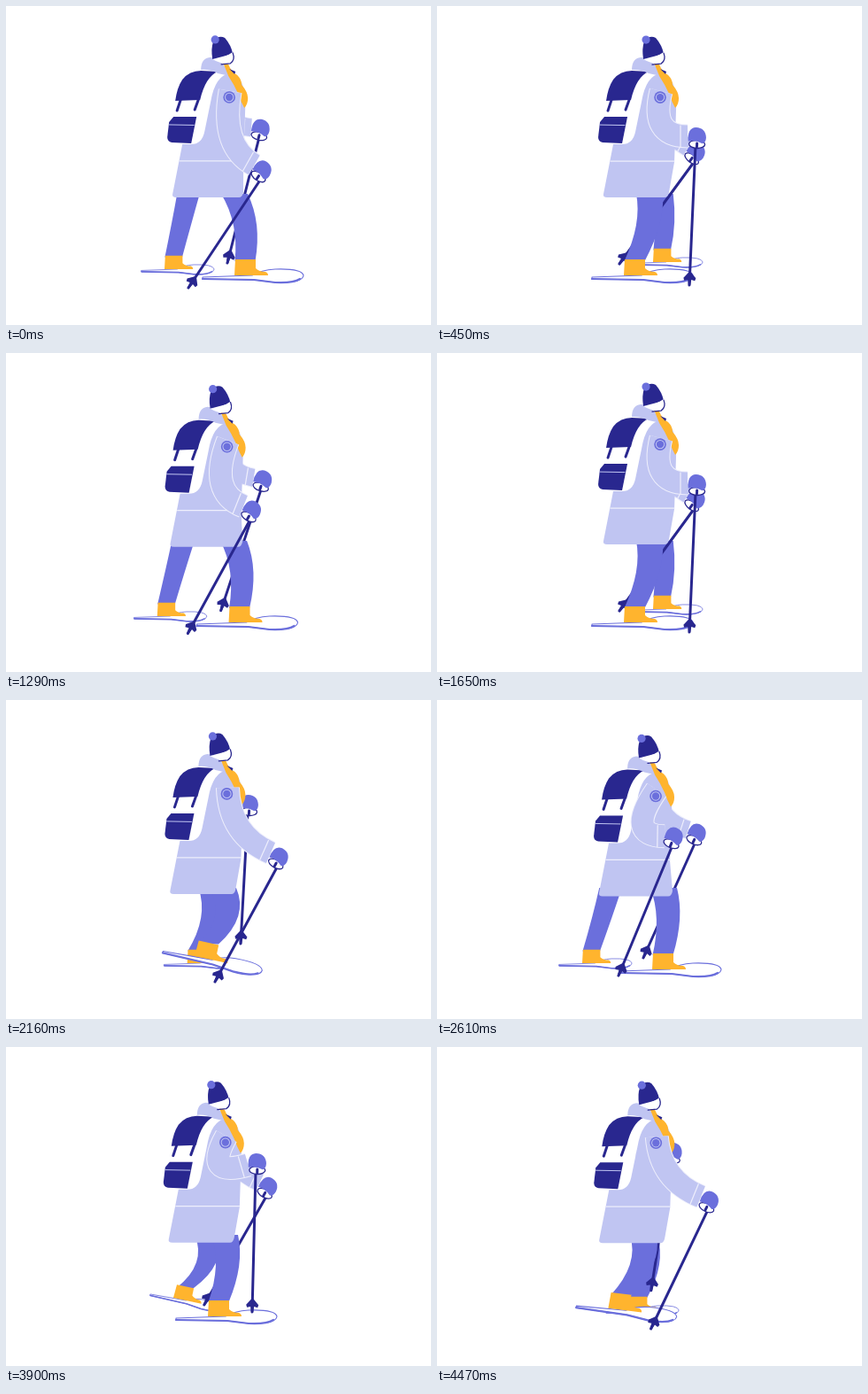
An HTML page with a canvas that plays this animation: 480x360 px, repeating every 4.5 s.

```html
<!DOCTYPE html>
<html lang="en">
<head>
<meta charset="utf-8">
<title>Ski walker</title>
<style>
html, body { margin: 0; width: 100%; height: 100%; overflow: hidden; background: #fff; }
canvas { display: block; }
</style>
</head>
<body>
<canvas width="480" height="360"></canvas>
<script>
const ctx = document.querySelector('canvas').getContext('2d');
const DARK = '#29278f', BLUE = '#6b6fdc', PALE = '#c0c5f2', GOLD = '#ffb42e', WHITE = '#fff', SEAM = '#eeeffc';
const LOOP = 4500, STRIDE = 1200;

// phase, heel x, lift, tilt in degrees, hip x, knee x
const LEG = [
  [0, 258, 0, 0, 258, 270],
  [.175, 243, 0, 0, 256, 261],
  [.25, 228, 0, 0, 247, 250],
  [.375, 211, 0, 0, 240, 238],
  [.5, 195, 0, 0, 220, 212],
  [.68, 180, 0, 0, 210, 200],
  [.715, 189, 7, 5, 229, 226],
  [.75, 205, 14, 12, 240, 240],
  [.8, 213, 15, 12, 245, 249],
  [.875, 260, 8, 0, 268, 271],
  [.94, 268, 2, -2, 266, 275]
];
// phase, hand x y, elbow x y, pole tip x y
const ARM = [
  [0, 290, 185, 242, 158, 206, 318],
  [.175, 268, 154, 212, 153, 205, 311],
  [.25, 284, 130, 222, 148, 278, 299],
  [.3, 287, 134, 230, 148, 281, 302],
  [.375, 294, 147, 240, 147, 285, 315],
  [.5, 300, 155, 246, 149, 266, 317],
  [.675, 306, 167, 251, 150, 249, 318],
  [.71, 308, 172, 252, 150, 243, 318],
  [.8, 309, 177, 252, 152, 236, 318],
  [.875, 305, 182, 250, 155, 222, 318]
];

// Periodic monotone cubic through the rows of a table
function sample(table, phase) {
  const n = table.length, p = phase - Math.floor(phase);
  const row = i => table[(i + n) % n];
  const time = i => row(i)[0] + Math.floor(i / n);
  let i = n - 1;
  while (table[i][0] > p) i--;
  const h = time(i + 1) - time(i), u = (p - time(i)) / h;
  return row(i).slice(1).map((a, k) => {
    const slope = j => (row(j + 1)[k + 1] - row(j)[k + 1]) / (time(j + 1) - time(j));
    const tangent = j => {
      const s = slope(j - 1), e = slope(j);
      return s * e > 0 ? 2 * s * e / (s + e) : 0;
    };
    const b = row(i + 1)[k + 1], v = 1 - u;
    return a * v * v * (1 + 2 * u) + b * u * u * (3 - 2 * u) +
      h * u * v * (tangent(i) * v - tangent(i + 1) * u);
  });
}

function fill(d, color) {
  ctx.fillStyle = color;
  ctx.fill(new Path2D(d));
}
function line(d, color, width) {
  ctx.strokeStyle = color;
  ctx.lineWidth = width;
  ctx.stroke(new Path2D(d));
}
function disc(x, y, r, color) {
  ctx.fillStyle = color;
  ctx.beginPath();
  ctx.arc(x, y, r, 0, 7);
  ctx.fill();
}
function at(x, y, angle, scale, draw) {
  ctx.save();
  ctx.translate(x, y);
  ctx.rotate(angle);
  ctx.scale(scale, scale);
  draw();
  ctx.restore();
}

function drawLeg(phase, far) {
  let [x, lift, tilt, hip, knee] = sample(LEG, phase);
  const size = far ? .85 : 1;
  if (far) { x -= 16; hip -= 14; knee -= 14; }
  const y = (far ? 297 : 304) - lift, angle = tilt * Math.PI / 180;
  at(x, y, angle, far ? .72 : 1, () => {
    const ski = 'M-36 2L20 0Q30 -6 46 -7Q76 -8 78 0Q77 9 46 8L22 5L-36 4Z';
    fill(ski, WHITE);
    line(ski, BLUE, 1.1);
    line('M-36 4L22 5L46 8Q66 9 74 4', BLUE, 2.2);
  });
  const ankleX = x + (12 + 17 * Math.sin(angle)) * size, ankleY = y - 16 * size + 12 * Math.sin(angle);
  const bend = 2 * knee - (hip + ankleX) / 2, top = 15 * size, low = 11.5 * size;
  fill(`M${hip - top} 212Q${bend - 13 * size} 245 ${ankleX - low} ${ankleY}
    L${ankleX + low} ${ankleY}Q${bend + 13 * size} 245 ${hip + top} 212Z`, BLUE);
  at(x, y, angle, size, () => fill('M1 -18L24 -18L24 -8Q28 -4 35 -4Q38 -3 38 0L0 0Z', GOLD));
}

function armPose(phase, far) {
  const pose = sample(ARM, phase);
  return far ? pose.map((v, i) => v - [12, 17, 0, 14, 16, 27][i]) : pose;
}

function drawPole([hx, hy, , , tx, ty]) {
  const angle = Math.atan2(hx - 2 - tx, ty - hy - 10);
  line(`M${hx - 2} ${hy + 10}L${tx} ${ty}`, DARK, 3);
  at(tx, ty, angle, 1, () => fill('M0 -16L7 -8L6 -5L2 -6L1 1L-1 1L-2 -6L-6 -5L-7 -8Z', DARK));
}

function drawGlove([hx, hy, , , tx, ty]) {
  const angle = Math.atan2(hx - 2 - tx, ty - hy - 10);
  at(hx, hy, angle, 1, () => {
    const cuff = 'M-9 9A9 4.5 0 0 1 9 9A9 4.5 0 0 1 -9 9Z';
    fill(cuff, WHITE);
    line(cuff, DARK, 1.3);
    fill('M-10 6Q-12 -9 -2 -10Q9 -10 10 1Q10 7 6 8Q-2 4 -10 6Z', BLUE);
    line('M0 8L0 12', DARK, 3);
  });
}

function drawSleeve([hx, hy, ex, ey], sx, sy, width) {
  const length = Math.hypot(hx - ex, hy - ey), ux = (hx - ex) / length, uy = (hy - ey) / length;
  const wx = hx - 11 * ux, wy = hy - 11 * uy, r = width / 2;
  const d = `M${sx} ${sy}Q${ex} ${ey} ${wx} ${wy}`;
  ctx.lineCap = 'butt';
  line(d, SEAM, width + 2);
  line(d, PALE, width);
  const cx = wx - 8 * ux, cy = wy - 8 * uy;
  line(`M${cx - r * uy} ${cy + r * ux}L${cx + r * uy} ${cy - r * ux}`, SEAM, 1.2);
  ctx.lineCap = 'round';
}

function drawBag() {
  line('M194 110L190 122M214 110L210 121', DARK, 3);
  fill('M188 111Q190 96 196 87Q204 77 217 77L236 78Q222 84 216 110Z', DARK);
  fill('M181 135L186 129L212 129L206 159L184 158Q179 157 179 152Z', DARK);
  line('M181 138L209 138.500', PALE, 1);
}

function drawCoat(front) {
  fill('M217 76Q217 63 227 62Q236 62 242 70L254 84L236 80Q226 75 217 76Z', PALE);
  fill(`M250 80Q233 82 228 112L221 146Q218 160 206 160L196 160L185 216Q184 220 189 220
    L${front - 4} 220Q${front} 220 ${front + 1} 214L265 180L267 120Q268 90 256 82Z`, PALE);
  line('M193 179L265 179', SEAM, 1.2);
}

function drawHead() {
  fill('M242 68L248 70Q251 78 258 82Q263 87 263 93Q270 101 270 108Q270 115 266 119Q262 112 259 103Q254 92 248 83Z', GOLD);
  fill('M249 75L256 78L255 81Z', DARK);
  fill('M230 64Q228 52 231 44Q237 36 244 40Q251 48 253 58Z', DARK);
  fill('M230 64Q243 63 253 56Q257 64 249 69Q240 70 230 64Z', WHITE);
  line('M253 57Q256 65 250 69L240 70', DARK, 1.3);
  disc(233, 42, 4.6, BLUE);
}

function drawPatch() {
  disc(249, 107, 6.8, BLUE);
  disc(249, 107, 5.2, PALE);
  disc(249, 107, 4.2, BLUE);
}

function draw(now) {
  const phase = now % LOOP / STRIDE % 1;
  const sway = Math.cos(4 * Math.PI * (phase - .44));
  const dx = 1 + 3 * sway, dy = -1.7 - 3.2 * sway;
  const near = armPose(phase), far = armPose(phase + .5, true);
  const front = Math.max(258, sample(LEG, phase)[3] + 9 - dx);
  ctx.fillStyle = WHITE;
  ctx.fillRect(0, 0, 480, 360);
  ctx.lineCap = ctx.lineJoin = 'round';

  drawLeg(phase + .5, true);
  drawPole(far);
  drawSleeve(far, 250 + dx, 105 + dy, 20);
  drawGlove(far);
  drawLeg(phase, false);
  at(dx, dy, 0, 1, () => {
    drawBag();
    drawCoat(front);
    drawHead();
  });
  drawPole(near);
  drawSleeve(near, 250 + dx, 100 + dy, 25);
  at(dx, dy, 0, 1, drawPatch);
  drawGlove(near);
}

let start;
function tick(now) {
  start ??= now;
  draw(now - start);
  requestAnimationFrame(tick);
}
requestAnimationFrame(tick);
</script>
</body>
</html>
```
